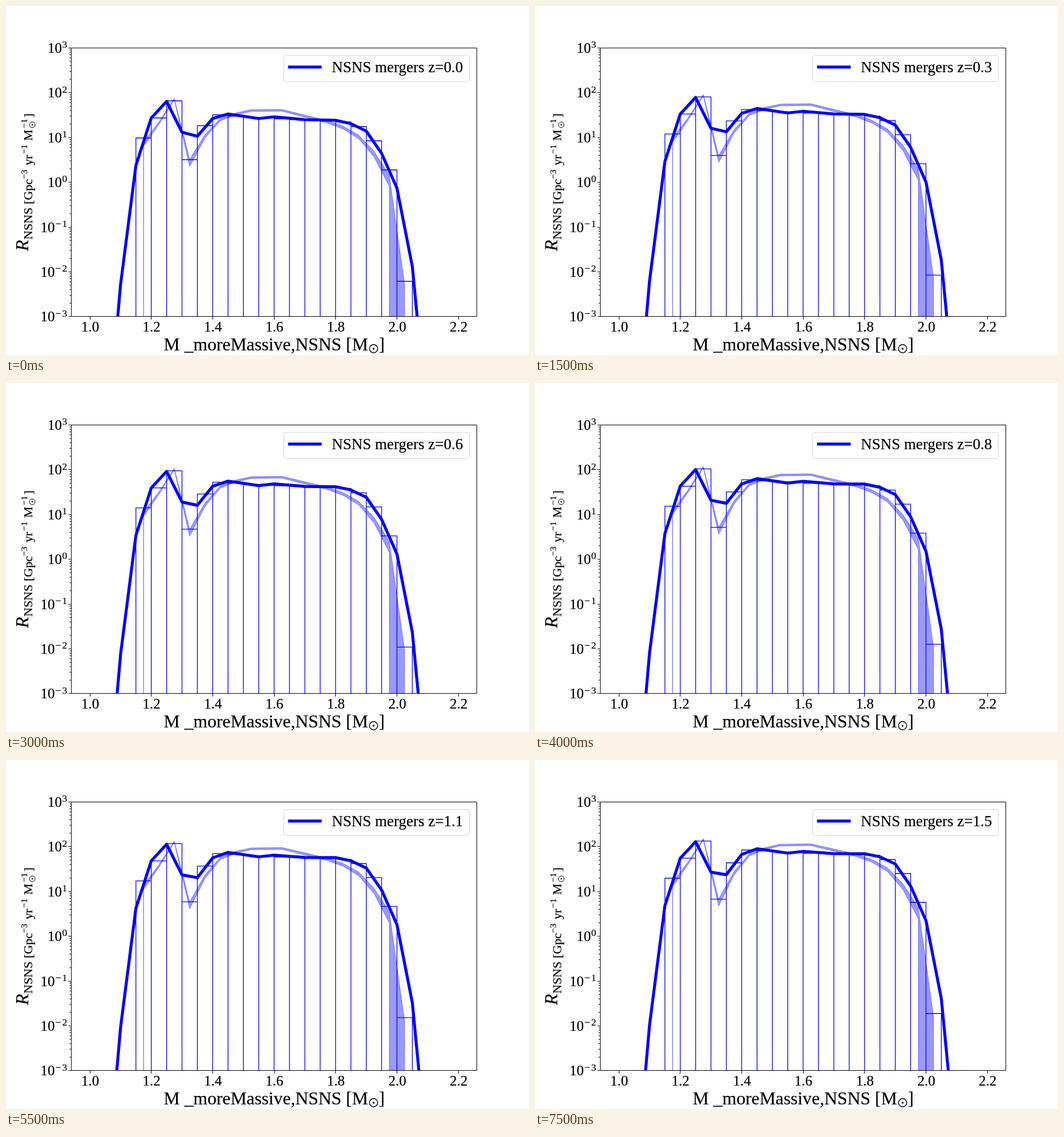
Write an HTML page that moves like this. It is 917 by 611 pixels and loops after 8 s.

```html
<!DOCTYPE html>
<html lang="en">
<head>
<meta charset="utf-8">
<title>Merger rate by mass</title>
<style>
html, body { margin: 0; width: 100%; height: 100%; overflow: hidden; background: #fff; }
svg { display: block; font-family: "Liberation Serif", "Times New Roman", serif; }
path, circle.ring { fill: none; }
text { stroke: #000; stroke-width: .2px; }
.tick { font-size: 25px; }
.sup { font-size: 17.5px; }
.label { font-size: 31.7px; }
.unit { font-size: 22px; }
.exp { font-size: 15.4px; }
</style>
</head>
<body>
<svg width="917" height="611" viewBox="0 0 917 611">
  <clipPath id="plot"><rect x="114.5" y="73.5" width="711" height="470.3"/></clipPath>
  <g clip-path="url(#plot)">
    <path id="band" style="fill:#00f" fill-opacity=".4" stroke="#00f" stroke-opacity=".4"/>
    <path id="bars" stroke="#00f" stroke-width="1.3"/>
    <path id="rate" stroke="#00f" stroke-width="5.2" stroke-linejoin="round"/>
  </g>
  <path id="axes" stroke="#000"/>
  <g id="ticks"></g>

  <rect x="487" y="86.5" width="325.5" height="46" rx="4.5" fill="#fff" fill-opacity=".8" stroke="#ccc" stroke-opacity=".8" stroke-width="1.2"/>
  <path d="M494.5 106.8H553.5" stroke="#00f" stroke-width="5.2"/>
  <text id="legend" x="571.3" y="116" font-size="27"></text>

  <g class="label">
    <text x="276.6" y="602.5">M _moreMassive,NSNS [M</text>
    <text x="653.5" y="602.5">]</text>
  </g>
  <circle class="ring" cx="644.5" cy="600" r="7.2" stroke="#000" stroke-width="1.4"/>
  <circle cx="644.5" cy="600" r="1.7"/>

  <g transform="rotate(-90)">
    <text class="label" x="-429" y="39" font-style="italic">R</text>
    <g class="unit">
      <text x="-409" y="45.5">NSNS</text>
      <text x="-347" y="45.5">[Gpc</text>
      <text x="-279" y="45.5">yr</text>
      <text x="-236" y="45.5">M</text>
      <text x="-195.5" y="45.5">]</text>
    </g>
    <g class="exp">
      <text x="-303" y="37">−3</text>
      <text x="-259" y="37">−1</text>
      <text x="-214" y="37">−1</text>
    </g>
    <circle class="ring" cx="-208" cy="46" r="5" stroke="#000"/>
    <circle cx="-208" cy="46" r="1.2"/>
  </g>
</svg>
<script>
const $ = id => document.getElementById(id);
const STEP = 500, STEPS = 16, DECADE = 78.4, FLOOR = 544, BELOW = 600;
const massX = m => 147 + (m - 1) * 538.5;

// Key points at z = 0: mass, height on the stage. Lines between them are straight.
const rateKeys = [
  [1.05, 795], [1.1, 488], [1.15, 279], [1.2, 196], [1.25, 167], [1.3, 221], [1.35, 228],
  [1.4, 197], [1.45, 189], [1.55, 197], [1.6, 194], [1.7, 199], [1.8, 200], [1.85, 206],
  [1.9, 219], [1.95, 258], [2, 319], [2.05, 456], [2.1, 735]
];
const barKeys = [
  [1.175, 231], [1.225, 196], [1.275, 166], [1.325, 269], [1.375, 209.5], [1.425, 190.5],
  [1.525, 195], [1.725, 200], [1.825, 203], [1.875, 211], [1.925, 236], [1.975, 287], [2.025, 482]
];
const bandKeys = [
  [1.175, 242], [1.225, 205], [1.275, 163], [1.325, 275], [1.375, 228], [1.425, 199], [1.475, 189],
  [1.525, 183], [1.625, 182.5], [1.775, 203], [1.825, 213], [1.875, 229], [1.925, 259], [1.975, 306]
];

// Rates grow as a power of 1 + z, a little faster for heavy stars.
const lift = (m, z) => Math.log(1 + z) / Math.log(2.5) *
  (29 + 5 * Math.tanh((m - 1.37) / 0.05) + 10 * Math.max(0, m - 1.6));
// Counting noise: the lower the rate, the wider the band.
const spread = y => 1.6 * 10 ** ((y - 183) / (2 * DECADE));

function between(keys, m) {
  const i = Math.max(1, keys.findIndex(key => key[0] > m - 1e-6));
  const [[a, ya], [b, yb]] = [keys[i - 1], keys[i]];
  return ya + (yb - ya) * (m - a) / (b - a);
}

const poly = points => "M" + points.map(p => p.join(" ")).join("L");

function draw(z) {
  const place = (m, y) => [massX(m), y - lift(m, z)];
  $("rate").setAttribute("d", poly(rateKeys.map(([m, y]) => place(m, y))));

  let bars = "";
  for (let i = 0; i < 18; i++) {
    const m = 1.175 + i * 0.05;
    const [, top] = place(m, between(barKeys, m));
    bars += `M${massX(m - 0.025)} ${FLOOR}V${top}H${massX(m + 0.025)}V${FLOOR}`;
  }
  $("bars").setAttribute("d", bars);

  const side = sign => bandKeys.map(([m, y]) => place(m, y + sign * spread(y)));
  const start = massX(1.175), low = massX(1.975), end = massX(2.025);
  $("band").setAttribute("d", poly([
    [start, BELOW], ...side(-1), place(2.025, 488), [end, BELOW], [low, BELOW], ...side(1).reverse()
  ]) + "Z");

  $("legend").textContent = `NSNS mergers z=${z.toFixed(1)}`;
}

function drawAxes() {
  let d = "M114.5 73.5H825.5V543.5H114.5Z", labels = "";
  const text = (cls, x, y, s, anchor) =>
    labels += `<text class="${cls}" x="${x}" y="${y}" text-anchor="${anchor}">${s}</text>`;
  for (let i = 0; i < 7; i++) {
    const x = massX(1 + i * 0.2);
    d += `M${Math.floor(x) + 0.5} 544v5`;
    text("tick", x + 0.5, 570, (1 + i * 0.2).toFixed(1), "middle");
  }
  for (let e = -3; e <= 3; e++) {
    const y = 73.4 + (3 - e) * DECADE;
    d += `M114.5 ${Math.floor(y) + 0.5}h-5`;
    text("tick", e < 0 ? 85.5 : 98, y + 8.5, "10", "end");
    if (e < 0) text("sup", 86.8, y - 0.2, "−", "start");
    text("sup", 98.4, y - 0.2, Math.abs(e), "start");
    for (let n = 2; n < 10 && e < 3; n++)
      d += `M114.5 ${(y - Math.log10(n) * DECADE).toFixed(1)}h-3`;
  }
  $("axes").setAttribute("d", d);
  $("ticks").innerHTML = labels;
}

let shown = -1;
function tick() {
  const k = Math.floor(performance.now() / STEP) % STEPS;
  if (k != shown) draw((shown = k) / 10);
  requestAnimationFrame(tick);
}
drawAxes();
tick();
</script>
</body>
</html>
```
